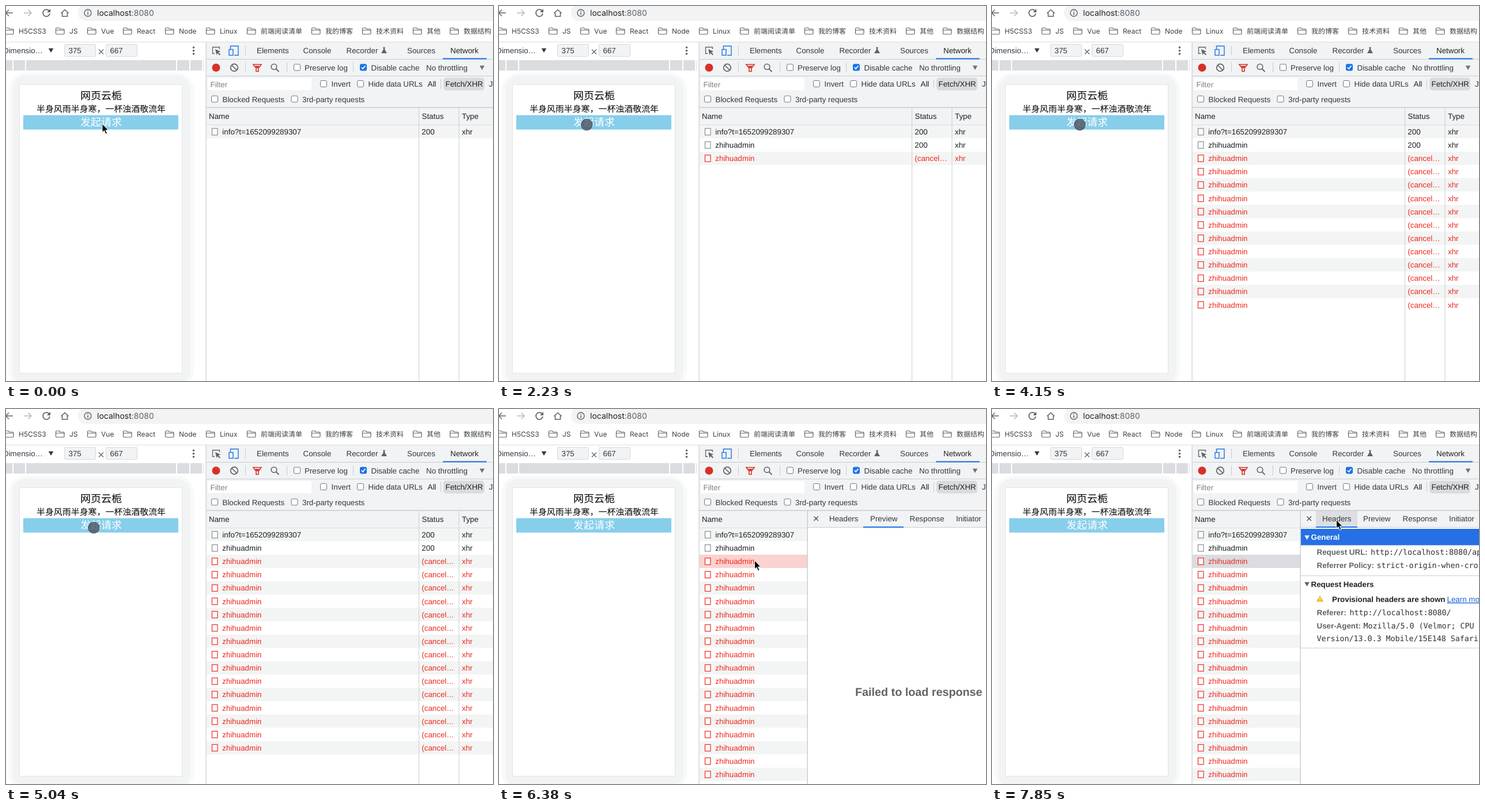
Recreate the animation shown at these times as an HTML page. Size 845x651 px, loop 8000 ms.

```html
<!DOCTYPE html>
<html lang="zh">
<head>
<meta charset="utf-8">
<title>Network panel</title>
<style>
  html, body { margin: 0; width: 100%; height: 100%; overflow: hidden; background: #fff; }
  svg { display: block; width: 100%; height: 100%; }
  text { font: 13.35px "Liberation Sans", sans-serif; fill: #303942; white-space: pre; text-rendering: geometricPrecision; }
  .ui { font: 12px Inter, "Noto Sans CJK SC", "Noto Sans CJK", sans-serif; fill: #3c4043; }
  .url { font-size: 14px; fill: #202124; }
  .cjk { font: 18px "Noto Sans CJK SC", "Noto Sans CJK", sans-serif; fill: #000; text-anchor: middle; }
  .sub { font-size: 14.95px; }
  .btn { fill: #fff; }
  .bold { font-weight: bold; }
  .key { font-weight: bold; fill: #5f6368; }
  .mono { font: 13.3px "DejaVu Sans Mono", monospace; fill: #303030; }
  .dark { fill: #202124; }
  .red { fill: #ed2b1f; }
  .grey { fill: #808080; }
  .white { fill: #fff; }
  .link { fill: #1a66d0; text-decoration: underline; }
  .fail { font-size: 19.75px; font-weight: bold; fill: #606468; }
</style>
</head>
<body>
<svg id="stage" viewBox="0 0 845 651" preserveAspectRatio="none"></svg>
<script>
const BAR = '#f1f3f4', LINE = '#cacdd1', ICON = '#5f6368', BLUE = '#1a73e8', RED = '#ed2b1f';
const STRIPE = '#f3f4f4', PINK = '#fad2cf', SELECTED = '#dadce0';
const LOOP = 8000, PITCH = 23.12;

const rect = (x, y, w, h, fill, extra = '') =>
  `<rect x="${x}" y="${y}" width="${w}" height="${h}" fill="${fill}" ${extra}/>`;
const text = (x, y, label, cls = '') => `<text x="${x}" y="${y}" class="${cls}">${label}</text>`;
const stroke = (d, color = ICON, width = 1.5, extra = '') =>
  `<path d="${d}" fill="none" stroke="${color}" stroke-width="${width}" ${extra}/>`;
const shape = (d, fill = ICON) => `<path d="${d}" fill="${fill}"/>`;
const circle = (x, y, r, fill, extra = '') => `<circle cx="${x}" cy="${y}" r="${r}" fill="${fill}" ${extra}/>`;
const group = (id, body, hidden) => `<g id="${id}" ${hidden ? 'visibility="hidden"' : ''}>${body}</g>`;
const divider = (x, y) => rect(x, y, 1, 17, LINE);
const down = (x, y, fill = ICON) => shape(`M${x - 4.3} ${y - 3.5}h8.6l-4.3 7.5z`, fill);

const folder = x => stroke(`M${x} 39.5q0-1.5 1.5-1.5h4l2 2h5.5q1.5 0 1.5 1.5v6q0 1.5-1.5 1.5h-11.5q-1.5 0-1.5-1.5zM${x} 42h14.5`, ICON, 1.2);
const checkbox = (x, y, on) =>
  rect(x - 5.5, y - 5.5, 11, 11, on ? BLUE : '#fff', `rx="2" stroke="${on ? BLUE : '#767676'}"`) +
  (on ? stroke(`M${x - 3.2} ${y}l2.4 2.6 4.2-5.4`, '#fff', 1.8) : '');

function browserBar() {
  const bookmarks = [[22, 'H5CSS3'], [110, 'JS'], [165, 'Vue'], [227, 'React'], [300, 'Node'], [371, 'Linux'],
    [442, '前端阅读清单'], [554, '我的博客'], [642, '技术资料'], [730, '其他'], [794, '数据结构']];
  return stroke('M12 12H0M5 6.5L-.5 12 5 17.5') +
    stroke('M31 12h13M38.5 6.5L44 12l-5.500 5.500', '#b6babe') +
    stroke('M75.500 9.500A6 6 0 1 0 76 13', ICON, 1.7) + shape('M77 5v6h-6z') +
    stroke('M95.500 12.500L102 6.500l6.500 6M97.500 11.500V18h9v-6.500', ICON, 1.6) +
    rect(125, -3, 760, 29, BAR, 'rx="14"') +
    circle(142, 12, 6, 'none', `stroke="${ICON}" stroke-width="1.4"`) +
    rect(141.3, 11, 1.5, 4.5, ICON) + rect(141.3, 8.3, 1.5, 1.6, ICON) +
    text(158, 17, 'localhost<tspan fill="#5f6368">:8080</tspan>', 'ui url') +
    bookmarks.map(([x, label]) => folder(x - 23.5) + text(x, 48, label, 'ui')).join('') +
    rect(0, 62, 845, 1, '#dadce0');
}

function devicePane() {
  const field = (x, label) => rect(x + .5, 66.5, 54, 21, BAR, 'rx="2" stroke="#d6d9dc"') + text(x + 7.5, 82, label);
  return text(-5, 82, 'Dimensio…') + down(78, 77, '#303942') +
    field(101, '375') + field(173, '667') + stroke('M161 75.500l8 8m0-8l-8 8', ICON, 1.3) +
    [72, 77.5, 83].map(y => circle(325.5, y, 1.8, ICON)).join('') +
    rect(0, 94, 343, 18, '#dadce0') +
    [11, 33, 295, 318, 340].map(x => rect(x, 94, 2, 18, '#fff')).join('') +
    rect(4.5, 116, 322, 545, '#f8f9f9', 'rx="30"') +
    rect(11, 121, 309, 535, '#f1f3f4', 'rx="24"') +
    rect(23.5, 136.5, 282, 501, '#fff', 'stroke="#e2e4e7"') +
    text(165, 162, '网页云栀', 'cjk') +
    text(165, 184, '半身风雨半身寒，一杯浊酒敬流年', 'cjk sub') +
    rect(30, 189.5, 269, 25, '#87ceeb') +
    text(165, 208, '发起请求', 'cjk btn');
}

function toolsHead() {
  const labels = [[435, 82, 'Elements'], [515.5, 82, 'Console'], [590.5, 82, 'Recorder'], [696, 82, 'Sources'],
    [518, 112, 'Preserve log'], [633.5, 112, 'Disable cache'], [729, 112, 'No throttling'],
    [564.5, 140, 'Invert'], [628.5, 140, 'Hide data URLs'], [838, 140, 'JS'],
    [375.5, 167, 'Blocked Requests'], [514, 167, '3rd-party requests']];
  return rect(347, 63, 498, 143, BAR) +
    rect(348, 92, 497, 1, LINE) + rect(348, 121, 497, 1, LINE) + rect(348, 175.5, 497, 1.5, LINE) +
    stroke('M362 82.500h-3.500v-11h12v3.500', ICON, 1.3) + shape('M363 75l9.500 4-4 1.300 3.500 3.700-1.500 1.500-3.500-3.700-1.500 3.500z') +
    stroke('M389.500 75v-5.500h13.500v16h-7', BLUE, 1.4) + rect(387, 75.5, 7, 10, 'none', `stroke="${BLUE}" stroke-width="1.4"`) +
    divider(415, 69) + shape('M654 71.500h4v1h-.800v3l3.800 6.500h-10l3.800-6.500v-3h-.800z') +
    rect(758, 90.5, 76, 2, BLUE) + text(771, 82, 'Network', 'dark') +
    circle(364.5, 107, 7, '#d93025') +
    circle(396, 107, 6.3, 'none', `stroke="${ICON}" stroke-width="1.7"`) + stroke('M391.500 102.500l9 9', ICON, 1.7) +
    divider(415, 98) + stroke('M429 101.500h14l-5 6.500v5.500h-4v-5.500z', '#d93025', 1.6) + shape('M432 104h8l-3 4h-2z', '#d93025') +
    circle(465, 105.5, 4.8, 'none', `stroke="${ICON}" stroke-width="1.6"`) + stroke('M468.500 109l5 5', ICON, 1.8) +
    divider(487, 98) + divider(602, 98) + down(826, 107, '#6e7378') +
    checkbox(505, 106.5) + checkbox(620, 106.5, true) +
    rect(350, 125, 180, 21, '#fff') + text(354.5, 141, 'Filter', 'grey') +
    checkbox(551, 135) + checkbox(615, 135) + checkbox(362, 161.5) + checkbox(500.5, 161.5) +
    text(731.5, 140, 'All', 'dark') + divider(754, 127) +
    rect(759, 124.5, 71, 22, '#d9dbde', 'rx="5"') + text(762.5, 140, 'Fetch/XHR', 'dark') +
    labels.map(l => text(...l)).join('');
}

function requestRow(i) {
  const y = 218.2 + i * PITCH, cls = i > 1 ? 'red' : 'dark';
  const cell = (x, label, extra = '') => `<text x="${x}" y="${y + 4.8}" class="${cls}" ${extra}>${label}</text>`;
  return group('row' + i,
    rect(348, y - 11.6, 497, PITCH, i % 2 ? '#fff' : STRIPE) +
    rect(357.5, y - 5.7, 9.5, 11.5, '#fff', `stroke="${i > 1 ? RED : '#8a8d91'}" stroke-width="1.2"`) +
    cell(375.3, i ? 'zhihuadmin' : 'info?t=1652099289307') +
    cell(721.3, i > 1 ? '(cancel…' : '200', `id="status${i}"`) + cell(791, 'xhr'), true);
}

function requestTable() {
  return rect(348, 177, 497, 29, BAR) + rect(348, 206, 497, 1, LINE) +
    text(352, 196, 'Name', 'dark') + text(721.5, 196, 'Status', 'dark') + text(791, 196, 'Type', 'dark') +
    Array.from({ length: 20 }, (_, i) => requestRow(i)).join('') +
    rect(716, 177, 1, 474, LINE) + rect(785.5, 177, 1, 474, LINE);
}

function headerDetails() {
  const pair = (y, key, x, value) => text(563.5, y, key, 'key') + text(x, y, value, 'mono');
  return rect(536, 208, 309, 28.5, '#2570e4') + down(546.5, 223, '#fff') + text(553.5, 227, 'General', 'bold white') +
    pair(253, 'Request URL:', 657, 'http://localhost:8080/api') +
    pair(276.3, 'Referrer Policy:', 667.5, 'strict-origin-when-cross-origin') +
    rect(536, 289, 309, 1, LINE) + down(546.5, 304) + text(553.5, 308.7, 'Request Headers', 'bold dark') +
    shape('M569 323.500l6 11h-12z', '#f2b51d') + rect(568.3, 327, 1.4, 3.8, '#fff') + rect(568.3, 331.8, 1.4, 1.4, '#fff') +
    text(590, 335, 'Provisional headers are shown', 'bold dark') + text(789.5, 335, 'Learn more', 'link') +
    pair(358, 'Referer:', 620.5, 'http://localhost:8080/') +
    pair(381, 'User-Agent:', 644.5, 'Mozilla/5.0 (Velmor; CPU OS') +
    text(563.5, 402.5, 'Version/13.0.3 Mobile/15E148 Safari/604.1', 'mono') +
    rect(536, 414.5, 309, 1, LINE);
}

function detailPanel() {
  return rect(535, 177, 310, 474, '#fff') + rect(535, 177, 310, 28, BAR) +
    group('hover', rect(0, 177, 72, 28, '#dcdee1')) +
    rect(535, 205, 310, 1, LINE) + rect(534.5, 177, 1.5, 474, LINE) +
    stroke('M546.500 186.500l7.500 7.500m0-7.500l-7.500 7.500', '#4a4e52', 1.4) +
    group('underline', rect(0, 204, 72, 2, BLUE)) +
    text(573, 195, 'Headers') + text(644, 195, 'Preview') + text(712.5, 195, 'Response') + text(793, 195, 'Initiator') +
    group('preview', text(618, 497.5, 'Failed to load response data', 'fail')) +
    group('headers', headerDetails());
}

const cursors =
  group('arrow', '<path d="M0 0V15l3.400-3.200 2.600 6 2.500-1.100-2.600-5.800h4.700z" fill="#000" stroke="#fff" stroke-width="1"/>') +
  group('touch', circle(0, 0, 9.8, '#474f57', 'fill-opacity=".78" stroke="#3f4850" stroke-opacity=".8"'));

stage.innerHTML = browserBar() + devicePane() + toolsHead() + requestTable() +
  group('panel', detailPanel()) + rect(346.5, 63, 1.2, 588, LINE) + cursors;

const el = id => document.getElementById(id);
const show = (id, on) => el(id).setAttribute('visibility', on ? 'inherit' : 'hidden');
const showRoot = (id, on) => { el(id).style.display = on ? '' : 'none'; };
const place = (id, x, y = 0) => el(id).setAttribute('transform', `translate(${x} ${y})`);

// Each burst adds a row about every 148 ms: [start, rows].
const bursts = [[0, 1], [890, 1], [2230, 1], [2670, 8], [3850, 5], [5040, 4]];
const rowTimes = bursts.flatMap(([start, n]) =>
  Array.from({ length: n }, (_, k) => start + Math.floor(k * 14.8) * 10));

const pointerSteps = [
  [0, 'arrow', 167, 204.5], [150, 'touch', 162, 203], [290, 'touch', 154.5, 201], [440, 'touch', 156.5, 200.5],
  [1790, 'touch', 154, 203], [1930, 'touch', 152.3, 206],
  [5790, 'arrow', 330, 240], [5930, 'arrow', 443.5, 263],
  [6830, 'arrow', 520, 238], [6980, 'arrow', 618, 206], [7120, 'arrow', 646, 193],
  [7410, 'arrow', 612, 195], [7560, 'arrow', 600.5, 193.5], [7700, 'arrow', 597.5, 192.5]];

function draw(t) {
  const [, kind, x, y] = pointerSteps.findLast(step => step[0] <= t);
  for (const id of ['arrow', 'touch']) showRoot(id, id === kind);
  place(kind, x, y);

  rowTimes.forEach((start, i) => show('row' + i, t >= start));
  const pending = t < 1040;
  el('status1').textContent = pending ? '(pending)' : '200';
  el('status1').setAttribute('class', pending ? 'grey' : 'dark');

  const open = t >= 6380, onHeaders = t >= 7850;
  showRoot('panel', open);
  showRoot('headers', onHeaders);
  showRoot('preview', !onHeaders);
  el('row2').firstChild.setAttribute('fill', onHeaders ? SELECTED : open ? PINK : STRIPE);
  showRoot('hover', y < 205 && x >= 562 && x < 702);
  place('hover', x < 634 ? 562 : 632);
  place('underline', onHeaders ? 562 : 632);
  el('hover').firstChild.setAttribute('width', x < 634 ? 72 : 70);
  el('underline').firstChild.setAttribute('width', onHeaders ? 72 : 70);
}

const origin = performance.now();
function tick() {
  draw((performance.now() - origin) % LOOP);
  requestAnimationFrame(tick);
}
tick();
</script>
</body>
</html>
```
